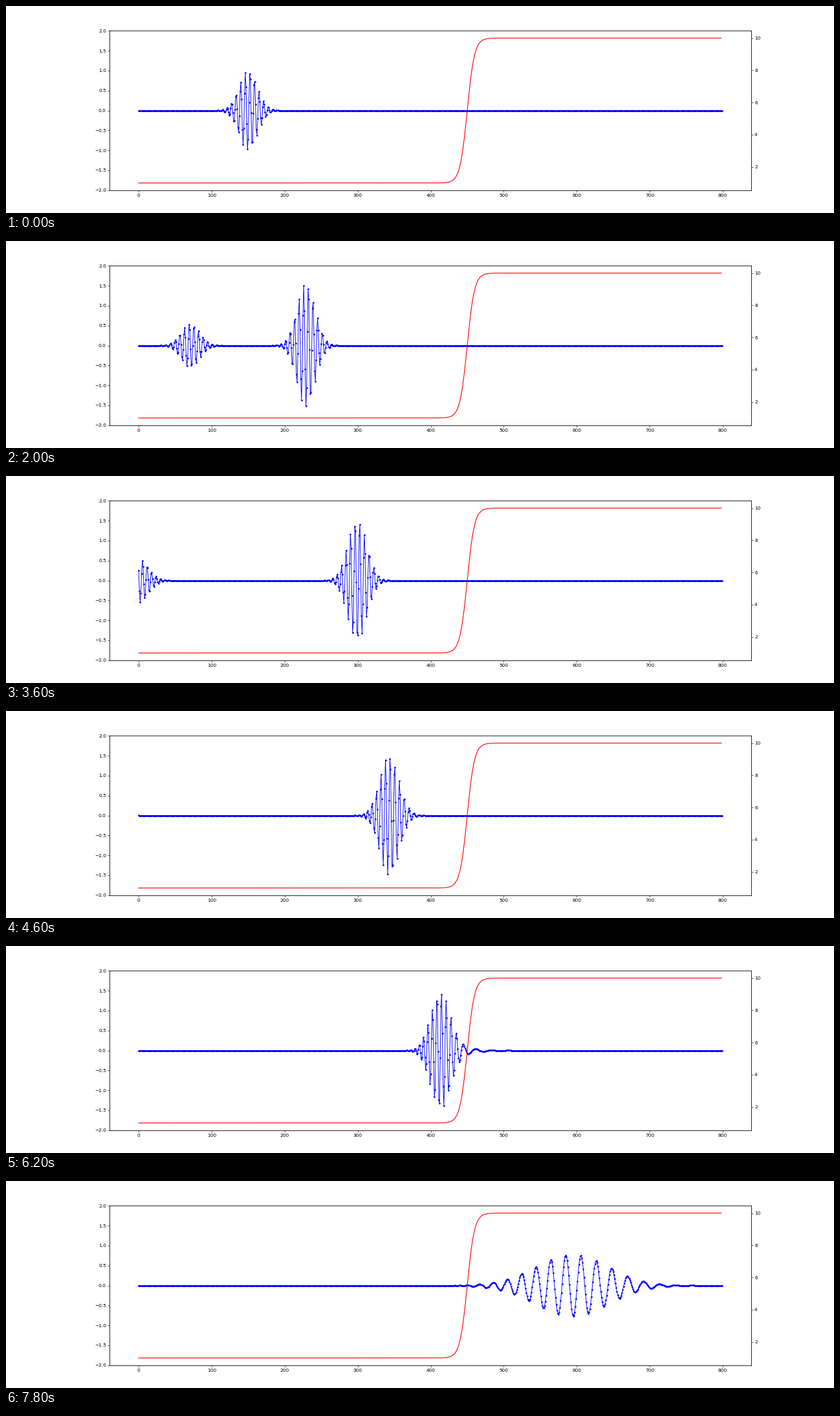
A matplotlib script that plays this animation: 1280 px wide and 320 px high, repeating every 8 s.

```python
import numpy as np
import matplotlib.pyplot as plt
from matplotlib.animation import FuncAnimation

FRAMES, INTERVAL = 40, 200
N, PAD = 800, 260          # visible points; extra cells let the left wave leave
DT, STEPS_PER_FRAME = 0.01, 1000


def stiffness(x):
    return 5.5 + 4.5 * np.tanh((x - 450) / 10)


def simulate():
    """Solve u_tt = (K u_x)_x and return the visible part for each frame."""
    x = np.arange(-PAD, N)
    k = stiffness(x[:-1]) * DT
    envelope = np.exp(-((x - 150) / 12.5) ** 2 / 2)
    u = np.sin(x) * envelope
    v = -2 * np.cos(x) * envelope
    v[[0, -1]] = 0

    def step():
        v[1:-1] += np.diff(k * np.diff(u))
        u[:] += DT * v

    states = [u[PAD:].copy()]
    step()
    states.append(u[PAD:].copy())
    while len(states) < FRAMES:
        for _ in range(STEPS_PER_FRAME):
            step()
        states.append(u[PAD:].copy())
    return states


states = simulate()
positions = np.arange(N)

fig, wave_ax = plt.subplots(figsize=(24, 6), dpi=1280 / 24)
fig.subplots_adjust(left=0.125, right=0.9, bottom=0.11, top=0.88)
wave, = wave_ax.plot(positions, states[0], "b.-", lw=1.2, ms=5)
wave_ax.set_ylim(-2, 2)

stiffness_ax = wave_ax.twinx()
stiffness_ax.plot(positions[:-1], stiffness(positions[:-1]), "r-", lw=1.5)


def draw(frame):
    wave.set_ydata(states[frame])
    return wave,


anim = FuncAnimation(fig, draw, frames=FRAMES, interval=INTERVAL,
                     repeat=True, repeat_delay=0)
plt.show()
```
